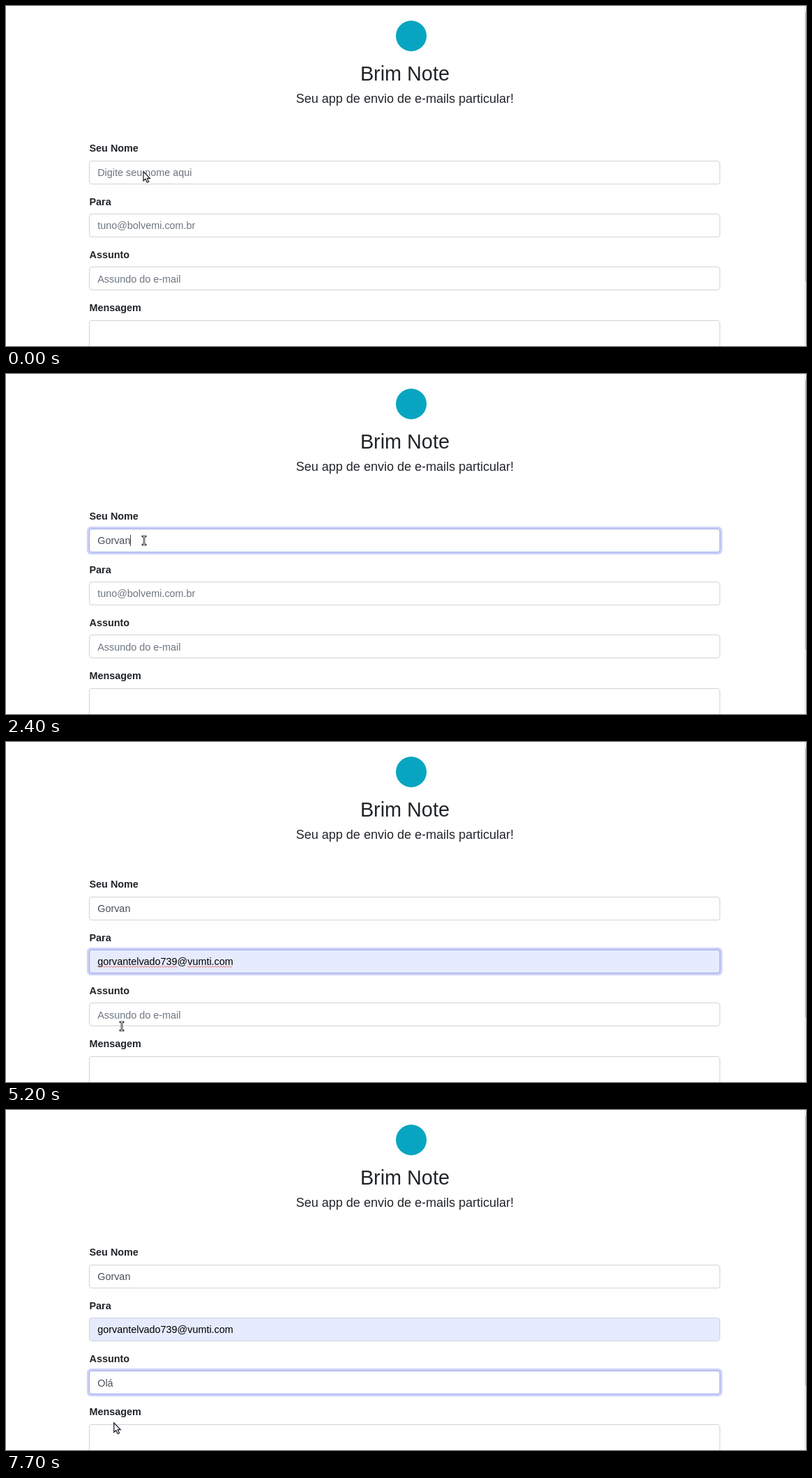
Write an HTML page that moves like this. It is 1147x488 px and loops after 8 s.

```html
<!DOCTYPE html>
<html lang="pt-BR">
<head>
<meta charset="utf-8">
<title>Brim Note</title>
<style>
  html, body { margin: 0; width: 100%; height: 100%; overflow: hidden; background: #fff; }
  svg { display: block; font: 14.4px "Liberation Sans", Arial, sans-serif; fill: #212529; }
  .menu text { font: 500 14px "Noto Sans", "Open Sans", sans-serif; fill: #1a1a20; }
  .menu { filter: drop-shadow(0 1px 1.5px rgba(0, 0, 0, .35)); }
</style>
</head>
<body>
<svg id="stage" width="1147" height="488" viewBox="0 0 1147 488">
  <circle cx="581" cy="43" r="22" fill="#07a5c1"/>
  <text x="571.9" y="107" font-size="28.8" text-anchor="middle">Brim Note</text>
  <text x="571.9" y="139" font-size="18" text-anchor="middle">Seu app de envio de e-mails particular!</text>
  <path d="M1145.5 0V488" stroke="#e3e3e3"/>
  <path d="M1146.5 0V488" stroke="#f4f4f4"/>
  <path d="M1146.5 9V395" stroke="#b9b9b9"/>
  <g id="form"></g>
</svg>
<script>
const LOOP = 8000;
const PITCH = 76.4;
const TEXT_X = 131.2;
const NAME = 'Gorvan';
const USER = 'gorvantelvado739';
const MAIL = USER + '@vumti.com';
const labels = ['Seu Nome', 'Para', 'Assunto', 'Mensagem'];
const hints = ['Digite seu nome aqui', 'tuno@bolvemi.com.br', 'Assundo do e-mail', ''];

const rowY = (first, i) => Math.round(first + PITCH * i);
const arrow = (x, y) => ({ cursor: ['arrow', x, y] });
const beam = (x, y) => ({ cursor: ['beam', x, y] });
const name = n => ({ name: NAME.slice(0, n) });
const menu = (y, items, alpha = 1, more = {}) => ({ menu: { y, items, alpha, width: 163, ...more } });
const mailMenu = (alpha, hot) => menu(333.5, [MAIL], alpha, { width: 234, hot });
const nameMenu = alpha => menu(257, [NAME], alpha);
const subjectMenu = alpha => menu(410, ['Olá'], alpha);
const names = [NAME, 'Teste', 'Nome', 'Outro', 'Aluno', 'Novo'];
const subjects = ['Normal', 'Reunião', 'Teste', 'Olá'];
const none = { menu: null };

// Each step [time, ...changes] holds until the next one.
const steps = [
  [0, arrow(197, 237.5), none, { focus: -1, glow: 0, caret: false, name: '', mail: '', subject: '', preview: false, spell: false }],
  [400, beam(198, 239)],
  [600, { focus: 0, glow: .6, caret: true }, menu(257, names)],
  [1000, { glow: 1 }],
  [1100, name(1), menu(257, names, .5)],
  [1200, nameMenu(1)],
  [1400, name(2)],
  [1700, name(3)],
  [1800, name(4)],
  [2000, name(5), nameMenu(.5)],
  [2100, name(6), nameMenu(.1)],
  [2400, none],
  [2600, beam(190, 250)],
  [2700, arrow(171, 274), { caret: false }],
  [2800, arrow(157.5, 288)],
  [3100, arrow(156, 299), { caret: true }],
  [3200, beam(158, 315), { caret: false }],
  [3500, { focus: 1, glow: .6, caret: true }, mailMenu(1)],
  [3800, arrow(153, 331), { glow: 1, preview: true }, mailMenu(1, true)],
  [4300, { preview: false, mail: MAIL, spell: true }, mailMenu(.6, true)],
  [4400, mailMenu(.3, true)],
  [4500, mailMenu(.1, true)],
  [4800, none, arrow(158, 358), { caret: false }],
  [4900, beam(164, 391)],
  [5200, beam(166, 408)],
  [5300, { focus: 2, glow: .6, caret: true, spell: false }, menu(238, subjects, .6)],
  [5400, { glow: 1 }, menu(238, subjects)],
  [5800, { caret: false }],
  [6100, { subject: 'O', caret: true }],
  [6200, { subject: 'Ol' }, menu(238, subjects, .4)],
  [6300, subjectMenu(1)],
  [6800, { subject: 'Ol´' }],
  [6900, { subject: 'Olá' }, subjectMenu(.5)],
  [7000, subjectMenu(.1)],
  [7300, none],
  [7400, arrow(163, 414), { caret: false }],
  [7600, arrow(159, 431)],
  [7700, arrow(154.8, 449)],
];

const ruler = document.createElement('canvas').getContext('2d');
ruler.font = '14.4px "Liberation Sans", Arial, sans-serif';
const endOf = s => TEXT_X + ruler.measureText(s).width;

const text = (x, y, s, attrs = '') => `<text x="${x}" y="${y}" ${attrs}>${s}</text>`;
const rect = (x, y, w, h, r, attrs) =>
  `<rect x="${x}" y="${y}" width="${w}" height="${h}" rx="${r}" ${attrs}/>`;

function wave(from, to, y) {
  let d = `M${from} ${y}`;
  for (let x = from + 2, up = true; x <= to; x += 2, up = !up) d += `L${x} ${up ? y + 2 : y}`;
  return `<path d="${d}" fill="none" stroke="#e0604f" stroke-width=".9"/>`;
}

function drawField(s, i) {
  const y = rowY(221.6, i), base = rowY(243.9, i);
  const value = [s.name, s.mail, s.subject, ''][i];
  const focused = s.focus === i;
  const filled = i === 1 && (s.mail || s.preview);
  let out = text(119.5, rowY(209.2, i), labels[i], 'font-weight="700"');
  if (focused) out += rect(116, y - 3, 911, 40, 6, `fill="#ced1f9" opacity="${s.glow}"`);
  out += rect(119.5, y + .5, 904, i === 3 ? 90 : 33, 3.5,
    `fill="${filled ? '#e6ebfd' : '#fff'}" stroke="${focused ? '#9aaae8' : '#ced4da'}"`);
  if (i === 1 && s.preview) out += text(TEXT_X, base - .5, MAIL, 'font-size="11.3" fill="#000"');
  else out += text(TEXT_X, base, value || hints[i],
    `fill="${!value ? '#6c757d' : filled ? '#000' : '#495057'}"`);
  if (i === 1 && s.spell) {
    out += wave(TEXT_X, endOf(USER), base + 1.5);
    out += wave(endOf(USER + '@'), endOf(MAIL), base + 1.5);
  }
  if (focused && s.caret) {
    const x = Math.floor(endOf(value)) + .5;
    out += `<path d="M${x} ${y + 9}V${y + 25}" stroke="#343a40"/>`;
  }
  return out;
}

function drawMenu({ y, items, alpha, width, hot }) {
  const row = 30.5;
  const body = rect(118.7, y, width, 13 + row * items.length, 2.5, 'fill="#22222c"');
  const mark = hot ? rect(118.7, y + 6.5, width, row, 0, 'fill="#523af8"') : '';
  const lines = items.map((s, i) => text(129, y + 26 + row * i, s)).join('');
  return `<g class="menu" opacity="${alpha}">${body}${mark}${lines}</g>`;
}

function drawCursor([kind, x, y]) {
  const bar = 'M-2 -6H2M0 -6V6M-2 6H2';
  const shape = kind === 'arrow'
    ? '<path d="M0 0V13.4L3 10.7L5.3 15.7L7.7 14.6L5.4 9.8H9.4Z" fill="#fff" stroke="#15151c" stroke-width="1.2"/>'
    : `<path d="${bar}" stroke="#111" stroke-width="2.6" stroke-linecap="square"/><path d="${bar}" stroke="#fff"/>`;
  return `<g transform="translate(${x} ${y})">${shape}</g>`;
}

const form = document.getElementById('form');
let shown = -1;

function frame(now) {
  const t = now % LOOP;
  const count = steps.filter(step => step[0] <= t).length;
  if (count !== shown) {
    shown = count;
    const s = Object.assign({}, ...steps.slice(0, count).flatMap(step => step.slice(1)));
    form.innerHTML = labels.map((_, i) => drawField(s, i)).join('')
      + (s.menu ? drawMenu(s.menu) : '') + drawCursor(s.cursor);
  }
  requestAnimationFrame(frame);
}
frame(0);
</script>
</body>
</html>
```
